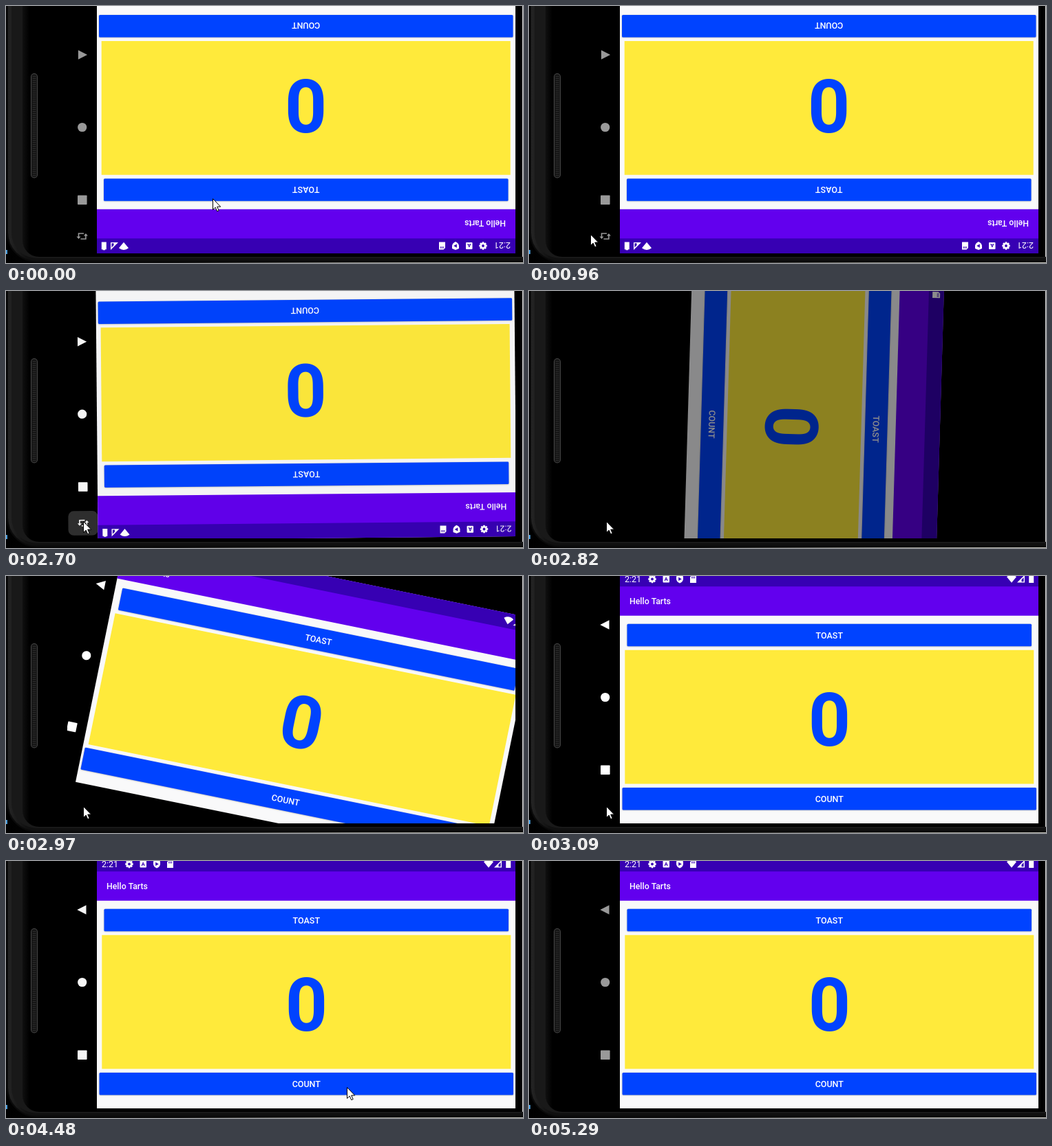
Animation, 751 px wide and 374 px high, one loop 8 s. Source, as an HTML page with a canvas:

```html
<!DOCTYPE html>
<html lang="en">
<head>
<meta charset="utf-8">
<title>Screen rotation</title>
<style>
html, body { margin: 0; width: 100%; height: 100%; overflow: hidden; background: #000; }
canvas { display: block; }
</style>
</head>
<body>
<canvas id="stage" width="751" height="374"></canvas>
<script>
const ctx = document.getElementById('stage').getContext('2d');
const LOOP = 8000;
const STEP = 135;                       // movement refreshes at this interval
const SPIN = { start: 2686, time: 391, x: 414.5, y: 176.5 };
const PRESS = 1990, RELEASE = 2550, POINTER_GONE = 5290;
const FONT = 'Roboto, sans-serif';
const WHITE = '#fff', STATUS = '#3700b3', BLUE = '#0043ff';

// Waypoints of the pointer tip, joined by straight moves.
const WAYPOINTS = [
  { t: 0, x: 299.5, y: 280 },
  { t: 405, x: 104, y: 310 },
  { t: 675, x: 76, y: 326 },
  { t: 1440, x: 112, y: 342 },
  { t: 2430, x: 112, y: 342 },
  { t: 2550, x: 112, y: 335 },
  { t: 3105, x: 112, y: 335 },
  { t: 3375, x: 393, y: 278 },
  { t: 3645, x: 393, y: 278 },
  { t: 3780, x: 480, y: 321 },
  { t: 4050, x: 495, y: 329 },
  { t: 5000, x: 495, y: 329 },
  { t: 5130, x: 740, y: 346 }
];

const clamp = v => Math.max(0, Math.min(1, v));
const mix = (a, b, k) => a + (b - a) * k;
const gray = v => `rgb(${v},${v},${v})`;

// Slow start and slower end: cubic-bezier(.4, 0, .294, 1)
function ease(x) {
  let lo = 0, hi = 1, s = 0.5;
  for (let i = 0; i < 24; i++) {
    const r = 1 - s;
    if (3 * s * r * (0.4 * r + 0.294 * s) + s ** 3 < x) lo = s; else hi = s;
    s = (lo + hi) / 2;
  }
  return s * s * (3 - 2 * s);
}

function box(x, y, w, h, color, radius = 0) {
  ctx.fillStyle = color;
  ctx.beginPath();
  ctx.roundRect(x, y, w, h, radius);
  ctx.fill();
}

function shape(path, color) {
  ctx.fillStyle = color;
  ctx.fill(new Path2D(path));
}

function disc(x, y, r, color) {
  ctx.fillStyle = color;
  ctx.beginPath();
  ctx.arc(x, y, r, 0, Math.PI * 2);
  ctx.fill();
}

function label(str, x, y, font, color, align = 'center') {
  ctx.font = `${font} ${FONT}`;
  ctx.textAlign = align;
  ctx.fillStyle = color;
  ctx.fillText(str, x, y);
}

function turn(angle, x, y, paint) {
  ctx.save();
  ctx.translate(x, y);
  ctx.rotate(angle);
  ctx.translate(-x, -y);
  paint();
  ctx.restore();
}

function fade(x0, x1, ...colors) {
  const g = ctx.createLinearGradient(x0, 0, x1, 0);
  colors.forEach((c, i) => g.addColorStop(i / (colors.length - 1), c));
  return g;
}

// One layer of the phone's edge; only its left and bottom sides are in view.
function shell(left, bottom, radius, color) {
  box(left, -60, 800, bottom + 60, color, radius);
}

function drawBody() {
  box(0, 0, 751, 374, fade(0, 751, '#000', '#111', '#8a8a84', '#c4c4bc'));
  box(0, 355, 2, 6, '#4a9fe0');
  shell(0.5, 373, 44, '#0a0a0a');
  shell(3, 370.5, 41, fade(3, 30, '#242424', '#1a1a1a', '#101010'));
  shell(8, 367, 37, '#191919');
  shell(24, 365, 24, fade(24, 34, '#101010', '#000'));
  box(36, 98, 10, 152.5, '#484848', 5);
  box(37, 99, 8, 150.5, '#161616', 4);
  for (let y = 102; y < 247; y += 3) box(38.5, y, 5, 1, '#2b2b2b');
  box(750, 0, 1, 365, '#e4e4e4');
}

function drawStatusIcons() {
  for (let i = 0; i < 4; i++) {
    turn(i * Math.PI / 4, 179, 4.5, () => box(177.6, -1.2, 2.8, 11.4, WHITE, 0.6));
  }
  disc(179, 4.5, 4.3, WHITE);
  disc(179, 4.5, 1.9, STATUS);

  box(194.5, -0.5, 9.5, 10, WHITE, 1);
  label('A', 199.2, 7.4, '700 8px', STATUS);

  shape('M219 -1.5 l5 2 v4.5 q-1 4 -5 5.5 q-4 -1.5 -5 -5.5 v-4.5z', WHITE);
  shape('M217.2 1.8 v5.2 l4.6 -2.6z', STATUS);

  shape('M236.5 -1 h6.5 v11 h-9 v-8.5z', WHITE);
  for (let i = 0; i < 3; i++) box(236.2 + i * 2, 0.7, 1, 2.8, STATUS);

  shape('M701 9.7 l-7 -8.5 q7 -5.2 14 0z', WHITE);
  shape('M720 -1.5 v11 h-11z', WHITE);
  shape('M718.6 2.2 v6 h-3.1 v-3z', STATUS);
  shape('M728 -1.8 h3.4 v1 h1.8 v10.8 h-7 v-10.8 h1.8z', WHITE);
}

function drawButton(str, y, w) {
  ctx.save();
  ctx.shadowColor = 'rgba(0,0,0,.3)';
  ctx.shadowBlur = 2;
  ctx.shadowOffsetY = 0.5;
  box(436.25 - w / 2, y, w, 32.5, BLUE, 1.5);
  ctx.restore();
  label(str, 436.3, y + 21.2, '500 12.5px', WHITE);
}

function drawApp() {
  box(132, -6.5, 608, 366.5, '#f9f9fa');
  box(132, -6.5, 608, 64.2, '#6200ee');
  box(132, -6.5, 608, 21.8, STATUS);
  label('2:21', 139, 9.2, '400 12.5px', WHITE, 'left');
  drawStatusIcons();
  label('Hello Tarts', 146, 41.3, '500 12.3px', WHITE, 'left');
  drawButton('TOAST', 69.8, 587.5);
  box(139.3, 107.8, 594, 194.8, '#ffea3b');
  label('0', 436.5, 246.8, '700 107px', BLUE);
  drawButton('COUNT', 308, 601.5);
}

// Two identical bent arrows, half a turn apart.
function drawRotateIcon(color) {
  for (const angle of [0, Math.PI]) {
    turn(angle, 110.7, 335, () => {
      ctx.strokeStyle = color;
      ctx.lineWidth = 1.6;
      ctx.stroke(new Path2D('M113 331 h-7.5 v5'));
      shape('M102.5 335.5 h6 l-3 3.5z', color);
    });
  }
}

function drawNav(color, flipped) {
  turn(flipped ? Math.PI : 0, 110.7, 71, () => shape('M103.3 71 l13.2 -6.8 v13.6z', color));
  disc(110.7, 176.5, 6.6, color);
  box(104, 275.5, 13.6, 13.6, color, 0.8);
}

function drawOldScreen(now) {
  box(89, -6.5, 651, 366.5, '#000');
  if (now >= PRESS - STEP) {
    const w = mix(19, 43, clamp((now - PRESS + STEP) / STEP));
    box(110.5 - w / 2, 317.5, w, 35.5, '#2f2f2f', 8);
  }
  const color = gray(now >= RELEASE ? 250 : now >= PRESS ? 230 : 153);
  drawNav(color, true);
  drawRotateIcon(color);
  turn(Math.PI, 436, 176.75, drawApp);
}

function drawNewScreen(t) {
  box(89, -6.5, 651, 366.5, '#000');
  drawNav(gray(mix(255, 153, clamp((t - 4380) / 850))), false);
  drawApp();
}

function drawScreen(t, now) {
  const p = clamp((t - SPIN.start) / SPIN.time);
  const swapped = p > 0.2;
  const angle = Math.PI * ((swapped ? 1 : 0) - ease(p));
  const shade = swapped ? 1 - Math.min(1, p * 1.44) : p * 0.5;
  const spinning = p > 0 && p < 1;
  ctx.save();
  ctx.beginPath();
  ctx.rect(89, 0, 651, 360);
  ctx.clip();
  box(89, 0, 651, 360, '#000');
  turn(spinning ? angle : 0, SPIN.x, SPIN.y, () =>
    swapped ? drawNewScreen(t) : drawOldScreen(now));
  box(89, 0, 651, 360, `rgba(0,0,0,${shade})`);
  ctx.restore();
}

function pointerAt(t) {
  const next = WAYPOINTS.findIndex(w => w.t > t);
  if (next < 0) return WAYPOINTS[WAYPOINTS.length - 1];
  const a = WAYPOINTS[next - 1], b = WAYPOINTS[next];
  const k = (t - a.t) / (b.t - a.t);
  return { x: mix(a.x, b.x, k), y: mix(a.y, b.y, k) };
}

function drawPointer(t) {
  const { x, y } = pointerAt(t);
  const arrow = new Path2D('M0 0 v16 l3.7 -3.4 l2.5 5.6 l2.5 -1 l-2.5 -5.6 h5z');
  ctx.save();
  ctx.translate(Math.round(x) + 0.5, Math.round(y) + 0.5);
  ctx.fillStyle = WHITE;
  ctx.fill(arrow);
  ctx.strokeStyle = '#000';
  ctx.lineWidth = 1;
  ctx.stroke(arrow);
  ctx.restore();
}

function frame(time) {
  const now = time % LOOP;
  const t = Math.floor((now + 15) / STEP) * STEP;
  drawBody();
  drawScreen(t, now);
  if (now < POINTER_GONE) drawPointer(t);
  requestAnimationFrame(frame);
}
requestAnimationFrame(frame);
</script>
</body>
</html>
```
